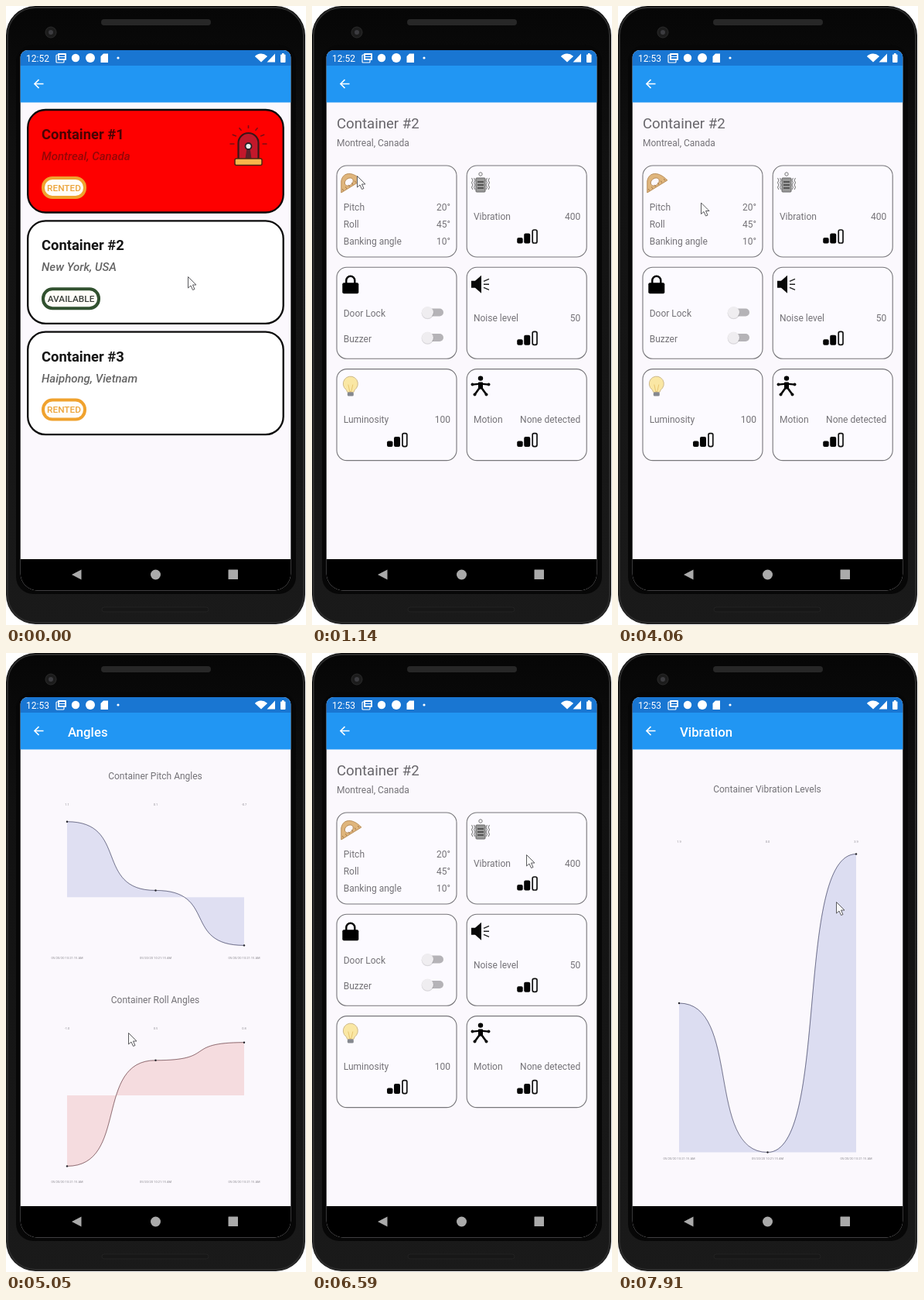
An HTML page with a canvas that plays this animation: 388x799 px, repeating every 8000 ms.

```html
<!DOCTYPE html>
<html lang="en">
<head>
<meta charset="utf-8">
<title>Container monitor</title>
<style>
html, body { margin: 0; width: 100%; height: 100%; overflow: hidden; background: #fff; }
canvas { display: block; width: 388px; height: 799px; }
</style>
</head>
<body>
<canvas id="stage"></canvas>
<script>
const W = 388, H = 799, LOOP = 8000;
const BG = '#fbf8fd', GREY = '#747277', BLUE = '63,85,181', RED = '210,60,55';
const canvas = document.getElementById('stage');
const ctx = canvas.getContext('2d');
const ratio = Math.max(1, window.devicePixelRatio || 1);
canvas.width = W * ratio;
canvas.height = H * ratio;

// Stops of the pointer tip: [arrival, x, y]
const STOPS = [[0, 235, 349], [1130, 58, 219], [1610, 277, 268], [1940, 254, 376],
  [2270, 234, 312], [2790, 100, 262], [3060, 178, 174], [3590, 131, 225],
  [4260, 83, 282], [5040, 158, 490], [5900, 68, 94], [6110, 38, 97],
  [6440, 277, 260], [7700, 282, 321]];

// It rests after each stop, then glides to the next.
function pointerAt(t) {
  const next = STOPS.findIndex(s => s[0] > t);
  if (next < 0) return STOPS[STOPS.length - 1].slice(1);
  const [t0, x0, y0] = STOPS[next - 1], [t1, x1, y1] = STOPS[next];
  const travel = Math.min(400, (t1 - t0) * .6);
  const u = Math.max(0, 1 - (t1 - t) / travel), k = u * u * (3 - 2 * u);
  return [x0 + (x1 - x0) * k, y0 + (y1 - y0) * k];
}

// Charts rise on an ease-out, redrawn twice in every 330 ms.
function growth(elapsed) {
  const rest = elapsed % 330;
  const shown = elapsed - rest + (rest >= 130 ? 130 : 0);
  return Math.sin(Math.PI / 2 * Math.min(1, shown / 475));
}

function paint(fill, stroke, width = 1) {
  if (fill) { ctx.fillStyle = fill; ctx.fill(); }
  if (stroke) { ctx.strokeStyle = stroke; ctx.lineWidth = width; ctx.stroke(); }
}
function box(x, y, w, h, r, fill, stroke, width) {
  ctx.beginPath();
  ctx.roundRect(x, y, w, h, r);
  paint(fill, stroke, width);
}
function dot(x, y, r, fill, stroke, width) {
  ctx.beginPath();
  ctx.arc(x, y, r, 0, 7);
  paint(fill, stroke, width);
}
function poly(points, fill, stroke, width) {
  ctx.beginPath();
  for (let i = 0; i < points.length; i += 2) ctx.lineTo(points[i], points[i + 1]);
  if (fill) ctx.closePath();
  paint(fill, stroke, width);
}
function text(s, x, y, size, color, style = '', align = 'left') {
  ctx.font = `${style} ${size}px Roboto, sans-serif`;
  ctx.textAlign = align;
  ctx.fillStyle = color;
  ctx.fillText(s, x, y);
}
function at(x, y, draw) {
  ctx.save();
  ctx.translate(x, y);
  draw();
  ctx.restore();
}

function phone() {
  ctx.fillStyle = '#fff';
  ctx.fillRect(0, 0, W, H);
  const body = ctx.createLinearGradient(0, 0, 0, H);
  body.addColorStop(0, '#060606');
  body.addColorStop(.25, '#111');
  body.addColorStop(1, '#1a1a1a');
  box(0, 0, W - 1, H - 1, 38, body);
  box(2, 2, W - 5, H - 5, 36, null, '#2a2a2a', 2);
  box(13, 50, W - 26, 709, 22, '#070707');
  box(123, 17, 142, 8, 4, '#272727');
  box(124, 776, 138, 6, 3, '#171717', '#222');
  dot(58, 34, 7, '#1c1c1c', '#2b2b2b');
  dot(58, 34, 3, '#3c3c40');
}

function statusBar(clock) {
  const blue = '#1976d2';
  box(18, 57, 352, 20, 0, blue);
  text(clock, 26, 71.5, 12, '#fff');
  box(65, 63, 10, 10, 1, null, '#fff', 1.2);
  box(67, 61, 11, 9, 1, '#fff');
  [63, 66].forEach(y => box(69, y, 7, 2, 0, blue));
  dot(90, 67, 5.2, '#fff');
  dot(109, 67, 6, '#fff');
  poly([126, 61.5, 132, 61.5, 132, 73, 122.5, 73, 122.5, 65], '#fff');
  dot(145, 67, 1.6, '#fff');
  ctx.beginPath();
  ctx.moveTo(330, 72.5);
  ctx.arc(330, 72.5, 11, -2.4, -.75);
  paint('#fff');
  poly([348, 61.5, 348, 72.5, 337.5, 72.5], '#fff');
  box(355, 62.5, 6.5, 10.5, 1, '#fff');
  box(357, 61, 2.5, 2, 0, '#fff');
}

function appBar(title) {
  box(18, 77, 352, 47.5, 0, '#2196f3');
  poly([48.5, 100.5, 37, 100.5], null, '#fff', 1.7);
  poly([42.5, 95, 37, 100.5, 42.5, 106], null, '#fff', 1.7);
  text(title, 80, 107.5, 16.8, '#fff', '500');
}

function navBar() {
  box(18, 714, 352, 41, 0, '#000');
  poly([85, 734, 97.5, 727.5, 97.5, 740.5], '#aaa');
  dot(193.5, 734, 6.5, '#aaa');
  box(287.5, 727.5, 12.5, 12.5, .5, '#aaa');
}

function siren() {
  for (let i = 0; i < 7; i++) {
    const a = Math.PI * (1 + i / 6), c = Math.cos(a), s = Math.sin(a);
    poly([c * 18, s * 20 - 4, c * 24, s * 24 - 4], null, '#7d0c12', 1.6);
  }
  box(-13, -18, 26, 34, [13, 13, 2, 2], '#c3182b', '#3b1518', 2.2);
  poly([-4, 15, -2, 1, 2, 1, 4, 15], '#5b2029');
  dot(0, -1, 4, '#e9f1ec', '#262024', 1.8);
  box(-17.5, 15, 35, 8.5, 2, '#f8b64b', '#4c2412', 1.5);
}

function badge(label, w, color, ink) {
  box(48, 88, w - 4, 25, 12, '#fffdf8', color, 4);
  text(label, 46 + w / 2, 104.8, 11.8, ink, '500', 'center');
}

function listScreen(pressed) {
  ['Montreal, Canada', 'New York, USA', 'Haiphong, Vietnam'].forEach((place, i) => {
    const alarm = i === 0, free = i === 1;
    const fill = alarm ? '#fe0000' : pressed && free ? '#ebe9ed' : '#fff';
    at(0, 134 + i * 143.3, () => {
      box(28.2, 0, 330.5, 132.5, 23, fill, '#0b0b0b', 2.3);
      text(`Container #${i + 1}`, 46, 38, 18.4, alarm ? '#4a0303' : '#161616', 'bold');
      text(place, 46, 65, 15, alarm ? '#970606' : '#656565', 'italic 500');
      if (free) badge('AVAILABLE', 76, '#31512f', '#3b403b');
      else badge('RENTED', 58, '#f0a22e', '#eca53c');
      if (alarm) at(313.5, 48, siren);
    });
  });
}

// Icons are drawn around their centre.
function protractor() {
  ctx.beginPath();
  ctx.moveTo(-12, 13);
  ctx.lineTo(-12, -2);
  ctx.bezierCurveTo(-10, -14, 3, -15, 14, -3);
  ctx.closePath();
  paint('#dfb57c', '#b98d59');
  ctx.beginPath();
  ctx.ellipse(-2, -1, 6, 4.5, -.65, 0, 7);
  paint(BG, '#b98d59');
  for (let i = 0; i < 6; i++) {
    const x = i * 4 - 9, y = 10.5 - i * 2.6;
    poly([x, y, x - 1.5, y - 2.5], null, '#93683c', .8);
  }
}
function vibration() {
  box(-6, -6, 12, 18, 1, '#9a9a9a', '#666');
  dot(0, -11, 2.2, null, '#777');
  for (let y = -2; y < 8; y += 4) box(-4, y, 8, 2, 0, '#555');
  for (const x of [-11.5, -8.5, 8.5, 11.5]) {
    ctx.beginPath();
    for (let i = 0; i < 6; i++) ctx.lineTo(x - Math.sign(x) * 1.5 * (i % 2), i * 3 - 6);
    paint(null, '#858585', 1.1);
  }
}
function lock() {
  ctx.beginPath();
  ctx.arc(0, -5, 5.5, Math.PI, 0);
  ctx.lineTo(5.5, 1);
  ctx.moveTo(-5.5, -5);
  ctx.lineTo(-5.5, 1);
  paint(null, '#000', 2.4);
  box(-10.5, -2, 21, 14, 2, '#000');
}
function speaker() {
  box(-12, -4.5, 6, 9, 0, '#080808');
  poly([-7, -4.5, 1, -11.5, 1, 11.5, -7, 4.5], '#080808');
  for (let s = -1; s < 2; s++) poly([4, s * 4, 11, s * 7], null, '#222', 1.4);
}
function bulb() {
  ctx.beginPath();
  ctx.arc(0, -3, 9.5, 2.2, .94);
  ctx.lineTo(4, 8);
  ctx.lineTo(-4, 8);
  ctx.closePath();
  paint('#fae7a4', '#cdb98c');
  poly([-3, -2, -1, 7, 1, 7, 3, -2], null, '#e3bd62', .8);
  box(-4, 8, 8, 5, 1.5, '#85888f');
}
function person() {
  dot(0, -10, 3.2, '#000');
  box(-3, -5, 6, 9, 1, '#000');
  for (const s of [-1, 1]) {
    poly([0, -3, s * 10.5, -2], null, '#000', 2.4);
    poly([s, 2, s * 7.5, 11], null, '#000', 2.6);
    dot(s * 10.5, -2, 2, '#111');
    dot(s * 7.5, 11, 2, '#111');
  }
}

function bars() {
  box(65, 93, 7.5, 7.5, 2, '#050505');
  box(74, 87.5, 8, 13, 2, '#050505');
  box(85, 83, 5.8, 17, 2, null, '#111', 1.7);
}
function toggle(y) {
  box(114, y - 5, 24, 10, 5, '#b5b3b7');
  dot(117.5, y + .8, 7.9, 'rgba(0,0,0,.14)');
  dot(117.5, y, 7.5, '#efedf0');
}
function row(label, value, y) {
  text(label, 8.7, y, 12, GREY);
  text(value, 147, y, 12, GREY, '', 'right');
}
const gauge = (label, value) => () => { row(label, value, 69.7); bars(); };

const CARDS = [
  [protractor, () => {
    row('Pitch', '20°', 58);
    row('Roll', '45°', 79.5);
    row('Banking angle', '10°', 101.5);
  }],
  [vibration, gauge('Vibration', '400')],
  [lock, () => ['Door Lock', 'Buzzer'].forEach((label, i) => {
    row(label, '', 63.7 + i * 32.5);
    toggle(58.2 + i * 32.5);
  })],
  [speaker, gauge('Noise level', '50')],
  [bulb, gauge('Luminosity', '100')],
  [person, gauge('Motion', 'None detected')]
];

function detailScreen() {
  text('Container #2', 32, 157.5, 18.6, '#68666b');
  text('Montreal, Canada', 32, 180.5, 12, GREY);
  CARDS.forEach(([icon, content], i) => at(32 + i % 2 * 168.2, 206 + (i >> 1) * 131.3, () => {
    box(0, 0, 155, 118, 13, '#fcfaff', '#77767a', 1.1);
    at(17.8, 22, icon);
    content();
  }));
}

// heights: distance of the three points above the base line
function chart(title, top, base, bottom, heights, rgb, grow, gap = 34) {
  const points = heights.map((h, i) => [79 + i * 114.5, base - h * grow]);
  const trace = () => {
    ctx.beginPath();
    points.forEach(([x, y], i) => {
      if (!i) return ctx.moveTo(x, y);
      const [px, py] = points[i - 1], reach = (x - px) * .7;
      ctx.bezierCurveTo(px + reach, py, x - reach, y, x, y);
    });
  };
  text(title, 193, top, 12, GREY, '', 'center');
  trace();
  ctx.lineTo(308, base);
  ctx.lineTo(79, base);
  paint(`rgba(${rgb},${.165 * (.1 + .9 * grow)})`);
  trace();
  paint(null, `rgba(${rgb},.3)`, .9);
  paint(null, 'rgba(40,35,45,.6)', .8);
  points.forEach(([x, y], i) => {
    dot(x, y, 1.2, '#25252c');
    text((heights[i] / 100).toFixed(1), x, top + gap, 4, '#929096', '', 'center');
    text('05/20/20 10:21:15 AM', x, bottom, 4.1, '#929096', '', 'center');
  });
}

function anglesScreen(t) {
  const grow = growth(t - 4720);
  chart('Container Pitch Angles', 163, 315.3, 395, [110, 10, -70], BLUE, grow);
  chart('Container Roll Angles', 451.5, 571, 683.5, [-103, 51, 77], RED, grow);
}
function vibrationScreen(t) {
  chart('Container Vibration Levels', 180, 644.5, 654, [192.5, 0, 385], BLUE,
    growth(t - 6920), 65);
}

function pointer() {
  poly([.5, .5, .5, 15, 4, 12, 6.5, 17.5, 9, 16.5, 6.5, 11, 11, 11], '#fafafa', '#5c5c60');
}

function draw(t) {
  ctx.setTransform(ratio, 0, 0, ratio, 0, 0);
  phone();
  ctx.save();
  ctx.beginPath();
  ctx.roundRect(18.7, 57, 349.6, 697.5, [9, 9, 22, 22]);
  ctx.clip();
  box(18, 57, 352, 698, 0, BG);
  const angles = t >= 5050 && t < 6110, vibrating = t >= 6920;
  statusBar(t < 3790 ? '12:52' : '12:53');
  appBar(angles ? 'Angles' : vibrating ? 'Vibration' : '');
  if (t < 330) listScreen(t >= 130);
  else if (angles) anglesScreen(t);
  else if (vibrating) vibrationScreen(t);
  else detailScreen();
  navBar();
  at(...pointerAt(t), pointer);
  ctx.restore();
}

let start;
function frame(now) {
  start ??= now;
  draw((now - start) % LOOP);
  requestAnimationFrame(frame);
}
draw(0);
requestAnimationFrame(frame);
</script>
</body>
</html>
```
